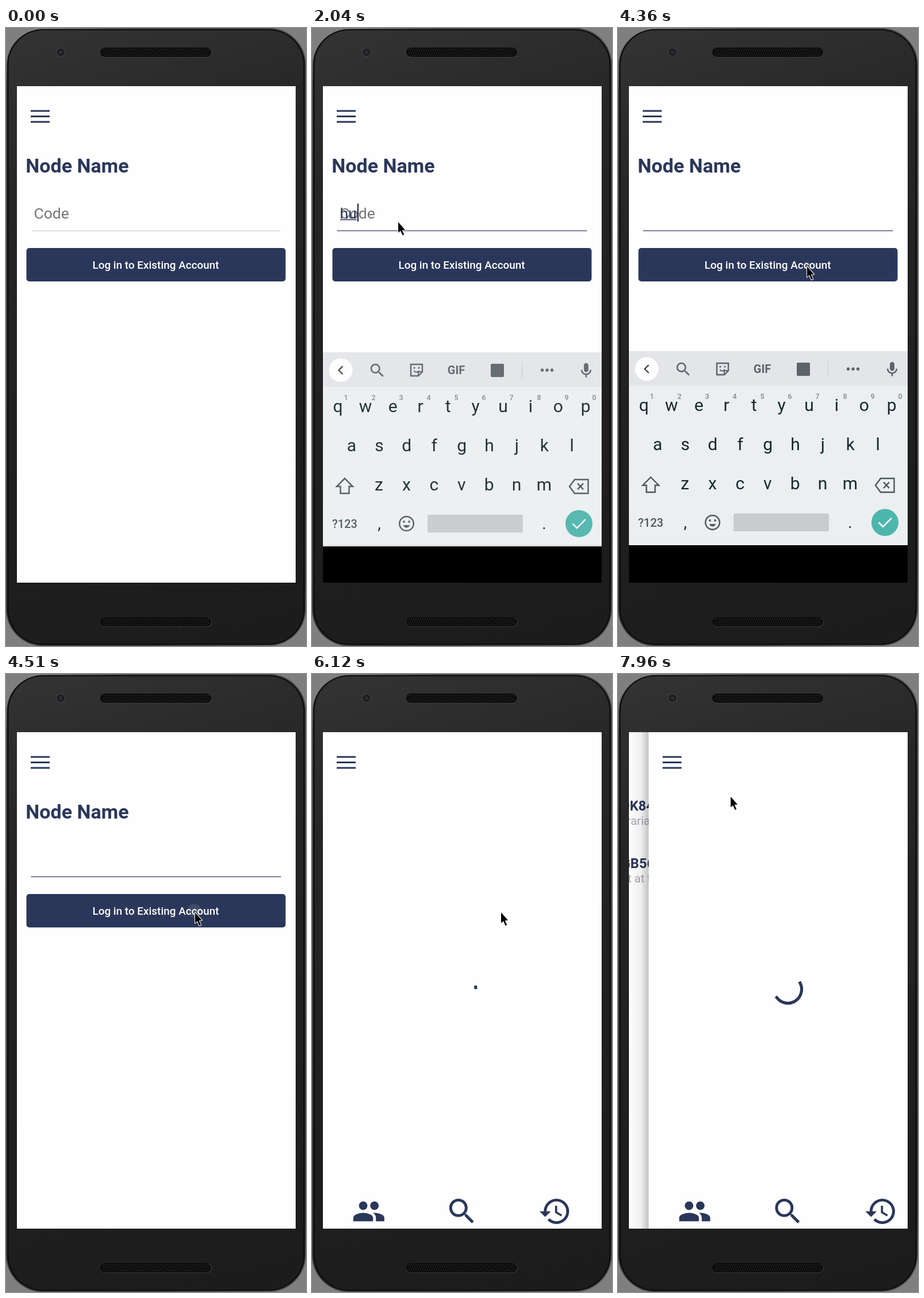
Animation, 522 px wide and 1073 px high, one loop 8000 ms. Source, as an HTML page with a canvas:

```html
<!DOCTYPE html>
<html lang="en">
<head>
<meta charset="utf-8">
<title>Phone login</title>
<style>
  html, body { margin: 0; width: 100%; height: 100%; overflow: hidden; background: #7f7f7f; }
  canvas { display: block; width: 522px; height: 1073px; }
</style>
</head>
<body>
<canvas id="stage"></canvas>
<script>
const W = 522, H = 1073, LOOP = 8000;
const NAVY = '#2b375a', WHITE = '#fefefe', KEY = '#15282e', ICON = '#5c6469';
const SCREEN = { x: 19, y: 101, w: 485, h: 862 };
const canvas = document.getElementById('stage');
const g = canvas.getContext('2d');
const dpr = window.devicePixelRatio || 1;
canvas.width = W * dpr;
canvas.height = H * dpr;

// Material style icons on a 24 unit grid
const ICONS = {
  person: 'M12 12c2.21 0 4-1.79 4-4s-1.79-4-4-4-4 1.79-4 4 1.79 4 4 4zm0 2c-2.67 0-8 1.34-8 4v2h16v-2c0-2.66-5.33-4-8-4z',
  people: 'M16 11c1.66 0 2.99-1.34 2.99-3S17.66 5 16 5c-1.66 0-3 1.34-3 3s1.34 3 3 3zm-8 0c1.66 0 2.99-1.34 2.99-3S9.66 5 8 5C6.34 5 5 6.34 5 8s1.34 3 3 3zm0 2c-2.33 0-7 1.17-7 3.5V19h14v-2.5c0-2.33-4.67-3.5-7-3.5zm8 0c-.29 0-.62.02-.97.05 1.16.84 1.97 1.97 1.97 3.45V19h6v-2.5c0-2.33-4.67-3.5-7-3.5z',
  search: 'M15.5 14h-.79l-.28-.27A6.471 6.471 0 0 0 16 9.5 6.5 6.5 0 1 0 9.5 16c1.61 0 3.09-.59 4.23-1.57l.27.28v.79l5 4.99L20.49 19l-4.99-5zm-6 0C7.01 14 5 11.99 5 9.5S7.01 5 9.5 5 14 7.01 14 9.5 11.99 14 9.5 14z',
  history: 'M13 3a9 9 0 0 0-9 9H1l3.89 3.89.07.14L9 12H6c0-3.87 3.13-7 7-7s7 3.13 7 7-3.13 7-7 7c-1.93 0-3.68-.79-4.94-2.06l-1.42 1.42A8.954 8.954 0 0 0 13 21a9 9 0 0 0 0-18zm-1 5v5l4.28 2.54.72-1.21-3.5-2.08V8H12z',
  chevron: 'M10 6L8.59 7.41 13.17 12l-4.58 4.59L10 18l6-6z',
  mic: 'M12 14c1.66 0 3-1.34 3-3V5c0-1.66-1.34-3-3-3S9 3.34 9 5v6c0 1.66 1.34 3 3 3zm5-3c0 2.76-2.24 5-5 5s-5-2.24-5-5H5c0 3.53 2.61 6.43 6 6.92V21h2v-3.08c3.39-.49 6-3.39 6-6.92h-2z'
};
for (const k in ICONS) ICONS[k] = new Path2D(ICONS[k]);

const clamp = v => Math.max(0, Math.min(1, v));
const span = (t, a, b) => clamp((t - a) / (b - a));
const outCubic = p => 1 - (1 - p) ** 3;

function icon(name, cx, cy, scale, color) {
  g.save();
  g.translate(cx - 12 * scale, cy - 12 * scale);
  g.scale(scale, scale);
  g.fillStyle = color;
  g.fill(ICONS[name]);
  g.restore();
}
function rect(x, y, w, h, color) {
  g.fillStyle = color;
  g.fillRect(x, y, w, h);
}
function round(x, y, w, h, r, color) {
  g.beginPath();
  g.roundRect(x, y, w, h, r);
  g.fillStyle = color;
  g.fill();
}
function dot(x, y, r, color) {
  g.beginPath();
  g.arc(x, y, r, 0, 7);
  g.fillStyle = color;
  g.fill();
}
function ring(x, y, r, width, color) {
  g.beginPath();
  g.arc(x, y, r, 0, 7);
  g.lineWidth = width;
  g.strokeStyle = color;
  g.stroke();
}
function line(points, width, color, close) {
  g.beginPath();
  points.forEach(([x, y]) => g.lineTo(x, y));
  if (close) g.closePath();
  g.lineWidth = width;
  g.strokeStyle = color;
  g.stroke();
}
function text(str, x, y, weight, size, color, align = 'left') {
  g.font = `${weight} ${size}px Roboto, sans-serif`;
  g.textAlign = align;
  g.fillStyle = color;
  g.fillText(str, x, y);
}

// ---------- phone body ----------
function speaker(y) {
  round(164, y, 194, 17, 8, '#3a3a3a');
  round(164, y, 193, 16, 8, '#0b0b0b');
  for (let r = 0; r < 4; r++)
    for (let x = 169 + (r % 2) * 2; x < 354; x += 4) dot(x, y + 3 + r * 3.4, 0.9, '#303030');
}
function phone() {
  rect(0, 0, W, H, '#7f7f7f');
  const rim = g.createLinearGradient(0, 0, W, H);
  rim.addColorStop(0, '#8c8c8c');
  rim.addColorStop(0.08, '#4c4c4c');
  rim.addColorStop(0.9, '#3a3a3a');
  rim.addColorStop(1, '#606060');
  round(0, 0, W, H, 64, rim);
  round(2, 2, W - 4, H - 4, 62, '#0c0c0c');
  const body = g.createLinearGradient(0, 0, 330, H);
  body.addColorStop(0, '#343434');
  body.addColorStop(0.25, '#262626');
  body.addColorStop(0.65, '#202020');
  body.addColorStop(1, '#1c1c1c');
  round(4.5, 4, W - 9, H - 8, 60, body);
  dot(95, 42, 8.5, '#3a3a3a');
  dot(95, 42, 6.5, '#1b1b1d');
  dot(95, 42, 3.5, '#2a2b33');
  speaker(34);
  speaker(1023);
}

// ---------- pages ----------
function pageBase() {
  rect(SCREEN.x, SCREEN.y, SCREEN.w, SCREEN.h, WHITE);
  for (const y of [142.5, 152, 161.5]) rect(43, y, 33, 3, NAVY);
}

const TYPED = [[1900, 'h'], [1990, 'hu'], [2090, 'hut'], [2910, 'hut6'], [3100, 'hut64'], [3190, 'hut649'], [4360, '']];
const typedAt = t => TYPED.reduce((s, [at, str]) => t >= at ? str : s, '');
const caretOn = t => t >= 1080 && t < 2680 || t >= 2910 && t < 3700;

function loginPage(t) {
  pageBase();
  text('Node Name', 34.3, 251, 700, 34, NAVY);

  if (t < 2090) text('Code', 48.5, 331, 400, 26.5, '#757575');
  const str = typedAt(t);
  text(str, 48.5, 331, 400, 26.5, NAVY);
  const end = 48.5 + g.measureText(str).width;
  if (str && t < 3290) rect(49, 332, end - 49, 1.5, NAVY);
  if (caretOn(t)) rect(end + 1, 305, 2.5, 31, NAVY);

  const focus = span(t, 1060, 1180);
  g.globalAlpha = 1 - focus;
  rect(46, 351.5, 431, 1.5, '#d6d6d6');
  g.globalAlpha = focus;
  rect(43.5, 351, 435, 2, '#85829f');
  g.globalAlpha = 1;

  round(35.5, 382, 451, 58, 5, NAVY);
  if (t >= 4360) dot(328, 411, 6 + 6 * span(t, 4360, 4510), 'rgba(255,255,255,.1)');
  text('Log in to Existing Account', 260.5, 418, 500, 18.9, '#fff', 'center');
}

// Eased half-cycle curve: cubic with control x at .2, .1 and end x at .5
function trim(x) {
  if (x <= 0) return 0;
  if (x >= 0.5) return 1;
  let lo = 0, hi = 1;
  for (let i = 0; i < 24; i++) {
    const s = (lo + hi) / 2, r = 1 - s;
    const v = 0.6 * r * r * s + 0.3 * r * s * s + 0.5 * s ** 3;
    if (v < x) lo = s; else hi = s;
  }
  return 3 * (1 - lo) * lo * lo + lo ** 3;
}
function spinner(ms) {
  const t = Math.max(0, ms) * 1.87, p = t % 1333 / 1333;
  const turn = t * 720 / 4444 / 360 + p * 0.25 - 0.25;
  const from = (turn + 0.75 * trim(p - 0.5)) * Math.PI * 2;
  const to = (turn + 0.75 * trim(p)) * Math.PI * 2;
  g.beginPath();
  g.arc(261, 547.5, 24, from, Math.max(to, from + 0.01));
  g.lineCap = 'square';
  g.lineWidth = 5.2;
  g.strokeStyle = NAVY;
  g.stroke();
  g.lineCap = 'butt';
}

function contact(y, name, note) {
  ring(87.5, y, 34.8, 1.6, NAVY);
  icon('person', 87.5, y, 2.81, NAVY);
  text(name, 139, y - 4, 700, 23.6, NAVY);
  text(note, 138.7, y + 21.5, 400, 20.2, '#a8a8b6');
  icon('chevron', 454, y, 2.02, NAVY);
}
function tabPage(spinTime, loaded) {
  pageBase();
  if (loaded) {
    contact(240.5, 'DOK847', 'Librarian');
    contact(340.5, 'HGB562', 'met at tolmos');
  } else spinner(spinTime);
  icon('people', 98.9, 933, 2.45, NAVY);
  icon('search', 260.9, 933, 2.45, NAVY);
  icon('history', 422.9, 933, 2.45, NAVY);
}

// New page slides in over the old one, which drifts left by a third
function push(p, under, over) {
  const shift = SCREEN.w * (1 - p);
  if (p < 1) {
    g.save();
    g.translate((shift - SCREEN.w) / 3, 0);
    under();
    g.restore();
    rect(SCREEN.x + SCREEN.w - (SCREEN.w - shift) / 3, SCREEN.y, SCREEN.w, SCREEN.h, WHITE);
    const edge = SCREEN.x + shift, sh = g.createLinearGradient(edge - 35, 0, edge, 0);
    sh.addColorStop(0, 'rgba(0,0,0,0)');
    sh.addColorStop(0.6, 'rgba(0,0,0,.06)');
    sh.addColorStop(1, 'rgba(0,0,0,.24)');
    rect(edge - 35, SCREEN.y, 35, SCREEN.h, sh);
  }
  g.save();
  g.translate(shift, 0);
  over();
  g.restore();
}

// ---------- keyboard ----------
function toolbar(t) {
  const words = t >= 2180 && t < 3290;
  dot(50, 592, 20.5, '#fff');
  const d = words ? -3.5 : 3.5;
  line([[50 + d, 585], [50 - d, 592], [50 + d, 599]], 2.4, '#44494d');
  icon('mic', 477, 592.8, 1.3, ICON);
  if (words) {
    const s = typedAt(t);
    const list = t < 2910 ? [s, 'huts', 'hurt'] : [s, 'hut', 'huts'];
    list.forEach((w, i) => text(w, 134 + i * 127, 599, 400, 20, '#37474f', 'center'));
    rect(197, 579, 1.5, 26, '#cfd1d5');
    rect(324, 579, 1.5, 26, '#cfd1d5');
    return;
  }
  icon('search', 113.5, 592.5, 1.31, ICON);
  // sticker
  line([[172, 582], [192, 582], [192, 595], [185, 602], [172, 602]], 2.4, ICON, true);
  line([[192, 595], [185, 595], [185, 602]], 2, ICON);
  dot(178, 588, 1.6, ICON);
  dot(186, 588, 1.6, ICON);
  g.beginPath();
  g.arc(181.5, 591, 4.5, 0.4, 2.7);
  g.stroke();
  text('GIF', 251, 599, 700, 20, ICON, 'center');
  round(311, 581, 23, 23, 2, ICON);
  rect(365, 578, 1.5, 28, '#d0d2d5');
  for (const x of [400.5, 409, 417.5]) dot(x, 592, 2.7, ICON);
}
function keyRow(keys, x, y) {
  [...keys].forEach((k, i) => text(k, x + i * 47.9, y, 400, 30, KEY, 'center'));
}
function keyboard(t) {
  rect(19, 561, 485, 60, '#e4e5e9');
  rect(19, 621, 485, 277, '#ebefef');
  toolbar(t);
  keyRow('qwertyuiop', 45, 665);
  for (let i = 0; i < 10; i++) text((i + 1) % 10, 59 + i * 48, 644, 500, 12.5, '#80888c', 'center');
  keyRow('asdfghjkl', 69, 733);
  keyRow('zxcvbnm', 116.5, 801);
  const grey = '#4c575d';
  line([[57, 780], [71, 794], [64.5, 794], [64.5, 806], [49.5, 806], [49.5, 794], [43, 794]], 2.4, grey, true);
  line([[448, 794], [457, 782], [480.5, 782], [480.5, 806], [457, 806]], 2.4, grey, true);
  line([[462, 788.5], [472, 799]], 2.4, grey);
  line([[472, 788.5], [462, 799]], 2.4, grey);
  text('?123', 57, 866, 500, 20, grey, 'center');
  text(',', 117, 868, 400, 28, KEY, 'center');
  ring(164.5, 858.5, 12.3, 2.4, grey);
  dot(160, 855, 1.9, grey);
  dot(169, 855, 1.9, grey);
  g.beginPath();
  g.arc(164.5, 859.5, 6, 0.3, 2.84);
  g.fillStyle = grey;
  g.fill();
  round(201, 843, 166, 31, 3, '#c8ccce');
  text('.', 404, 868, 400, 28, KEY, 'center');
  dot(464.5, 858.5, 23.5, '#4db6ac');
  line([[453.5, 858.5], [461, 866], [476, 851]], 2.6, '#fff');
}
function keyboardLayer(t) {
  if (t < 1890 || t >= 4510) return;
  const p = t < 4360 ? outCubic(span(t, 1890, 2140)) : 1 - span(t, 4360, 4510) ** 2;
  if (t < 4460) rect(19, 897.5, 485, 65.5, '#000');
  g.save();
  g.globalAlpha = p;
  g.translate(0, 33 * (1 - p));
  keyboard(t);
  g.restore();
}

// ---------- pointer ----------
const PATH = [
  [230, 436, 1009], [450, 330, 640], [640, 170, 345], [740, 138, 304], [890, 150, 337],
  [3640, 150, 337], [3720, 212, 322], [3790, 269, 308], [3900, 305, 272], [4050, 325, 350], [4220, 329, 414],
  [6470, 329, 414], [6540, 338, 463], [6710, 338, 463], [6800, 353, 530], [6950, 275, 770],
  [7060, 178, 886], [7100, 172, 894], [7160, 166, 898], [7300, 174, 700], [7530, 192, 257], [7600, 196, 213]
];
function pointer(t) {
  if (t < 230) return;
  let i = 0;
  while (i < PATH.length - 1 && PATH[i + 1][0] <= t) i++;
  const a = PATH[i], b = PATH[i + 1] || a;
  const p = a === b ? 0 : span(t, a[0], b[0]);
  g.save();
  g.translate(a[1] + (b[1] - a[1]) * p, a[2] + (b[2] - a[2]) * p);
  g.lineJoin = 'round';
  line([[0, 0], [0, 18.5], [4, 15], [7.6, 23], [10.2, 21.8], [6.8, 14], [12, 13.5]], 2, '#fff', true);
  g.fillStyle = '#000';
  g.fill();
  g.restore();
}

function draw(t) {
  g.setTransform(dpr, 0, 0, dpr, 0, 0);
  phone();
  g.save();
  g.beginPath();
  g.rect(SCREEN.x, SCREEN.y, SCREEN.w, SCREEN.h);
  g.clip();
  const login = () => loginPage(t);
  const list = () => tabPage(Math.min(t, 6120) - 4674, t >= 6310);
  const detail = () => tabPage(t - 7815, false);
  if (t < 4640) login();
  else if (t < 7680) push(outCubic(span(t, 4640, 5120)), login, list);
  else push(outCubic(span(t, 7680, 8160)), list, detail);
  keyboardLayer(t);
  g.restore();
  pointer(t);
}

const start = performance.now();
function tick() {
  draw((performance.now() - start) % LOOP);
  requestAnimationFrame(tick);
}
tick();
</script>
</body>
</html>
```
